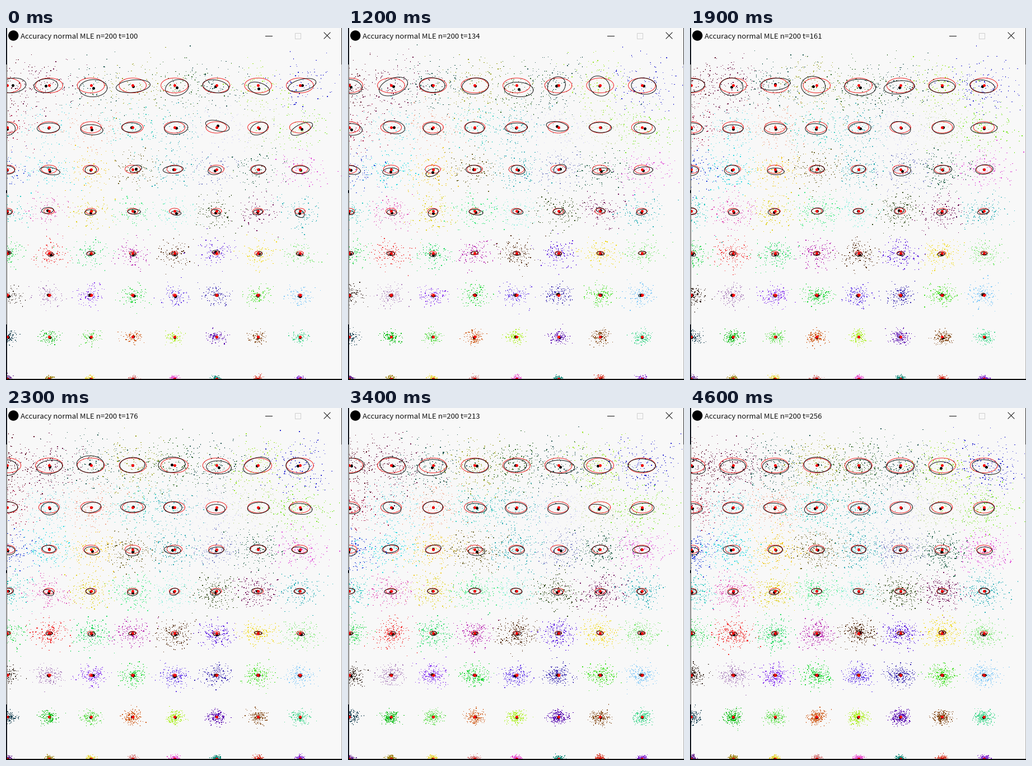
Recreate the animation shown at these times as a matplotlib script. Size 600x627 px, loop 5 s.

```python
import numpy as np
import matplotlib.pyplot as plt
from matplotlib.animation import FuncAnimation
from matplotlib.patches import Circle, Rectangle

W, H, DPI = 600, 627, 64
PX = 72 / DPI
FRAMES, INTERVAL = 50, 100
GRID = 8
PAPER = "#f8f8f8"

# start time in ms -> sample size shown from then on
STEPS = {0: 100, 600: 113, 700: 117, 800: 121, 1200: 134, 1500: 146,
         1900: 161, 2300: 176, 2900: 193, 3400: 213, 3900: 233, 4600: 256}

COLOURS = [
    "#5a0a22 #6e1a4a #1f5a50 #98a020 #2f6a28 #2a5a58 #9ae62a #2a2ad0",
    "#a81e4a #7adfe6 #f0a890 #3ccfc0 #50b8c0 #d8d8f4 #cfe0b0 #7ae62a",
    "#1a3ad8 #28d8e0 #f0c828 #6e6428 #28a8b0 #8088c8 #206048 #e050d8",
    "#28c8c0 #e058b8 #e0d020 #40e880 #98f0e0 #304a18 #701058 #30b0b8",
    "#28d850 #f03030 #20d860 #b828b0 #50280c #5818e0 #f0d818 #80e878",
    "#382820 #b088c0 #8838f0 #20d838 #6840e8 #3828b0 #40e020 #80c8f8",
    "#204858 #18c020 #70e060 #d06020 #b0f030 #5808b0 #885020 #48d890",
    "#6a2a90 #a08820 #e8d848 #d88888 #e858d0 #209080 #d84838 #8830d0",
]
palette = " ".join(COLOURS).split()

rows, cols = np.divmod(np.arange(GRID * GRID), GRID)
centres = np.column_stack([2.3 + 74.65 * cols, 102.3 + 74.65 * rows])
sigmas = (GRID - rows)[:, None] * np.array([4.2, 3.1])
DRIFT = np.array([0, 0.08])  # samples sit slightly low, in sigmas
AXIS_SCALE = 0.0215  # semi-axes are proportional to variances
angle = np.linspace(0, 2 * np.pi, 61)
unit_circle = np.column_stack([np.cos(angle), np.sin(angle)])


def outlines(means, covs):
    """Ellipses as one polyline, separated by gaps."""
    rings = means[:, None] + AXIS_SCALE * unit_circle @ covs
    gaps = np.full((len(means), 1, 2), np.nan)
    return np.concatenate([rings, gaps], axis=1).reshape(-1, 2)


fig = plt.figure(figsize=(W / DPI, H / DPI), dpi=DPI, facecolor=PAPER)
ax = fig.add_axes([0, 0, 1, 1])
ax.set(xlim=(0, W), ylim=(H, 0))
ax.axis("off")


def box(x, y, w, h, **style):
    ax.add_patch(Rectangle((x, y), w, h, **style))


def stroke(xs, ys, colour="#111111", width=1.0, z=6):
    return ax.plot(xs, ys, color=colour, lw=width * PX, zorder=z)[0]


def dots(colour, z):
    return ax.plot([], [], "o", color=colour, ms=5 * PX, mew=0, zorder=z)[0]


# title bar
box(0, 0, W, 27, fc=PAPER, ec="none", zorder=5)
ax.add_patch(Circle((13.2, 13.5), 9.2, fc="black", ec="none", zorder=6))
title = ax.text(26, 19, "", fontsize=13.2 * PX, color="#111111",
                family="Noto Sans CJK JP", va="baseline", zorder=6)
stroke([463, 475], [13.5, 13.5])
box(515.5, 8.5, 10, 10, fc="none", ec="#cfcfcf", lw=PX, zorder=6)
stroke([568, 579], [8, 19])
stroke([568, 579], [19, 8])

# window edges
box(0, 0, 1.2, H, fc="#d0d0d0", ec="none", zorder=6)
box(1.2, 0, 1, H, fc="#555555", ec="none", zorder=6)
for top, bottom in [(0, 65), (289, 294), (528, H)]:
    box(0, top, 1.5, bottom - top, fc="#10141c", ec="none", zorder=7)
box(599.2, 0, 0.8, 65, fc="#333333", ec="none", zorder=7)
box(599.2, 65, 0.8, H - 65, fc="#b0b0b0", ec="none", zorder=7)
box(0, 625, W, 2, fc="#0a0a0a", ec="none", zorder=7)

cloud = ax.scatter([], [], s=(1.25 * PX) ** 2, marker="s", lw=0, zorder=1)
true_covs = np.array([np.diag(s ** 2) for s in sigmas])
stroke(*outlines(centres, true_covs).T, "#f01010", 0.9, 2)
estimate_lines = stroke([], [], "black", 0.9, 3)
estimate_dots = dots("black", 4)
dots("#fa0505", 4.5).set_data(*centres.T)


def draw(frame):
    size = [t for start, t in STEPS.items() if start <= frame * INTERVAL][-1]
    rng = np.random.default_rng(size)
    noise = DRIFT + rng.standard_normal((GRID * GRID, size, 2))
    samples = centres[:, None] + noise * sigmas[:, None]
    means = samples.mean(axis=1)
    residuals = samples - means[:, None]
    covs = residuals.transpose(0, 2, 1) @ residuals / size

    cloud.set_offsets(samples.reshape(-1, 2))
    cloud.set_facecolor(np.repeat(palette, size))
    estimate_lines.set_data(*outlines(means, covs).T)
    estimate_dots.set_data(*means.T)
    title.set_text(f"Accuracy normal MLE n=200 t={size}")
    return cloud, estimate_lines, estimate_dots, title


anim = FuncAnimation(fig, draw, frames=FRAMES, interval=INTERVAL, repeat=True)
plt.show()
```
